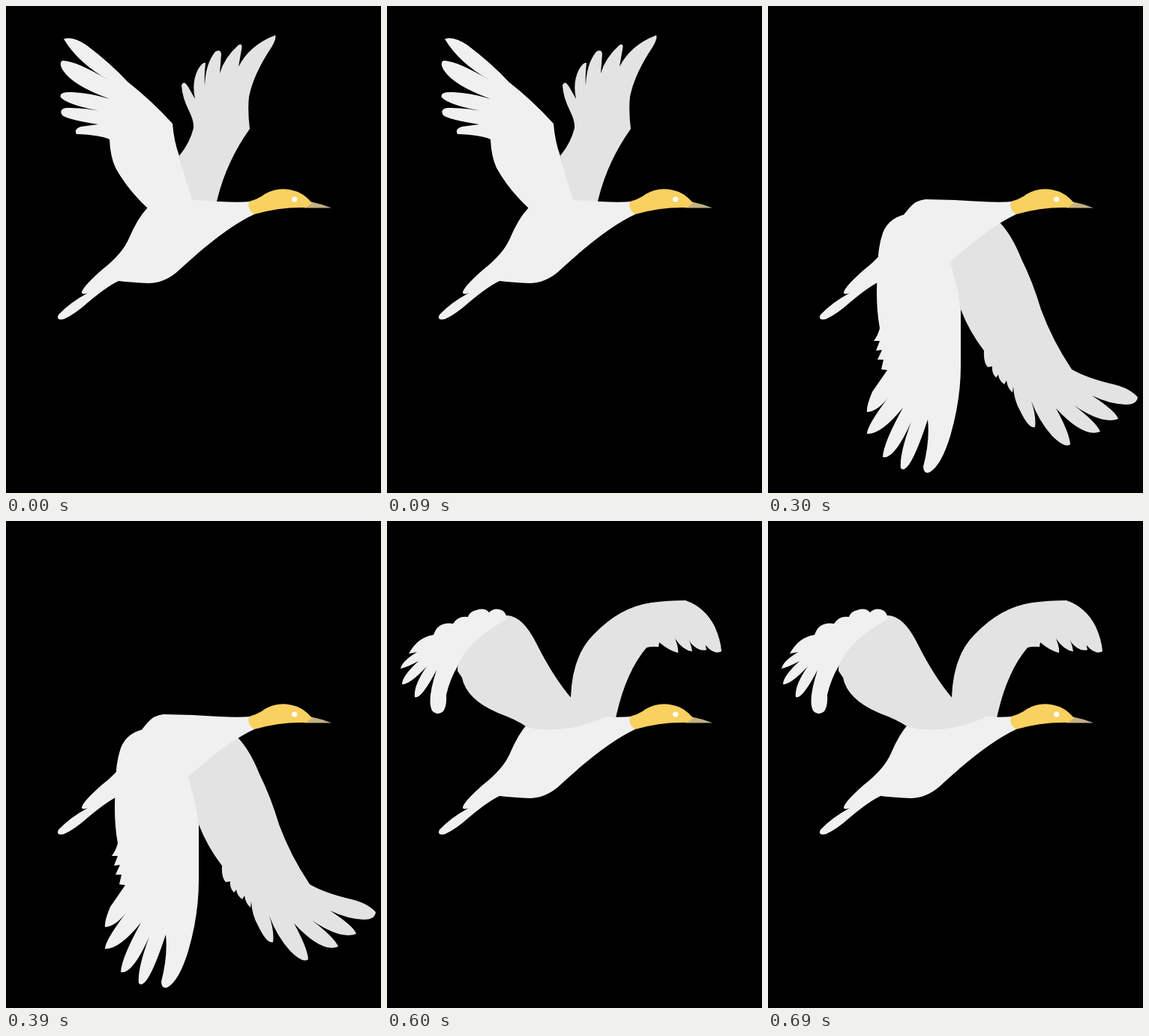
Animation of 500 by 650 pixels, one loop 0.75 s. Source, as an HTML page:

```html
<!DOCTYPE html>
<html lang="en">
<head>
<meta charset="utf-8">
<title>Flying bird</title>
<style>
  html, body { margin: 0; width: 100%; height: 100%; overflow: hidden; background: #000; }
  svg { display: block; }
  .light { fill: #f0f0f0; }
  .shade { fill: #e3e3e3; }
</style>
</head>
<body>
<svg width="500" height="650" viewBox="0 0 500 650">
  <defs>
    <linearGradient id="horn">
      <stop offset="0" stop-color="#cdb577"/>
      <stop offset="1" stop-color="#b9ad90"/>
    </linearGradient>
    <g id="bird">
      <path class="light" d="M325 261Q305 263 250 259L210 258Q197 259 188 270Q175 284 164 310Q155 331 128 352Q103 374 101 382Q101 386 109 383Q85 396 70 412Q66 420 77 418Q91 412 110 395Q135 374 150 367Q168 369 190 370Q210 370 228 355Q290 297 331 278Z"/>
      <path fill="url(#horn)" d="M405 261Q420 264 434 269.5L398 269.5Z"/>
      <path fill="#f9d160" d="M324 261Q336 258 345 251Q365 239 389 248Q400 253 408 263L400 269Q365 268 331 278Q321 272 324 261Z"/>
      <circle cx="384.7" cy="258" r="3.6" fill="#fff"/>
    </g>
  </defs>

  <g class="pose">
    <path class="shade" d="M359 39Q361 43 354 55Q330 91 324 121Q322 140 325 164Q293 209 281 261L245 262L231 200Q245 183 250 163Q251 154 244 140Q235 122 234 106Q237 98 243 108L252 124Q247 100 257 83Q263 74 266 76Q264 93 265 106Q266 77 279 61Q286 57 287 64L285 90Q291 69 310 52Q316 49 314 58L310 81Q325 52 359 39Z"/>
    <use href="#bird"/>
    <path class="light" d="M77 44Q89 40 107 52Q139 76 162 101Q195 127 222 157Q224 181 231 200Q238 230 249 260L189 270Q162 245 146 216Q139 201 138 178Q125 172 94 171Q90 164 100 161L123 158Q84 152 75 146Q70 138 80 136Q103 135 136 142Q83 133 73 122Q70 114 88 115Q112 116 138 124Q89 106 76 86Q70 76 75 73Q91 72 137 99Q96 76 77 44Z"/>
  </g>

  <g class="pose">
    <path class="shade" d="M266 312Q264 345 273 348Q300 350 345 350Q382 349 414 319Q432 300 433 265Q435 237 428 220Q417 224 414 257Q412 282 402 294Q409 269 405 240Q400 230 395 238L397 262Q396 280 386 294Q379 295 377 291Q384 276 379 264L364 265Q368 281 358 293Q363 276 357 266L345 266Q348 281 341 291Q334 285 331 275Z"/>
    <path class="shade" d="M243 259Q275 252 302 249Q317 250 325 263L320 280L245 285Z"/>
    <use href="#bird"/>
    <path class="shade" d="M172 288Q207 263 246 259Q238 293 258 326Q263 337 265 355Q260 365 245 366L200 345Z"/>
    <path class="light" d="M155 245Q160 246 165 262Q175 290 196 313Q222 341 250 363Q230 375 210 376Q185 379 165 386Q145 391 121 399L126 395L112 397Q97 395 85 388Q66 373 62 352Q61 343 72 347Q87 360 101 367Q72 348 61 323Q59 312 68 316Q86 333 119 354Q90 324 83 295Q82 280 92 281Q104 285 112 299Q124 317 144 332Q114 306 107 272Q108 259 117 260Q127 263 138 280Q147 296 157 308Q144 286 141 262Q146 244 155 245Z"/>
  </g>

  <g class="pose">
    <path class="shade" d="M238 335L308 288Q325 305 338 338Q353 368 364 405Q379 446 405 485Q426 497 461 505Q482 510 493 522Q492 532 477 532Q455 531 432 520Q464 541 467 551Q446 559 408 533Q438 556 443 568Q421 577 384 537Q402 570 403 585Q396 591 379 574Q361 554 351 527Q358 548 356 562Q348 565 336 540Q328 526 327 508L326 516Q319 510 318 500L315 505Q308 500 307 492L304 496Q298 490 299 481L293 482Q287 476 288 460Q268 434 257 405Z"/>
    <use href="#bird"/>
    <path class="light" d="M190 277Q162 280 153 303Q146 323 146 354Q143 398 149 430Q147 439 141 447L149 447L144 460L152 459L146 472L154 472L151 485L159 486Q150 499 139 515Q131 534 132 542Q146 541 160 523Q132 560 132 571Q151 572 180 536Q154 583 153 602Q168 606 191 555Q175 598 177 617Q188 628 213 552Q216 580 207 615Q208 626 216 622Q231 613 243 574Q257 526 257 480L257 405Q252 368 242 340L275 310L230 270Z"/>
  </g>

  <g class="pose">
    <path class="shade" d="M255 207Q295 171 317 164Q335 165 346 169Q351 177 350 188L349 208Q358 229 357 244L350 276Q340 307 340 337Q343 369 350 397Q348 407 336 402Q302 388 300 333Q300 360 296 376Q289 378 275 347L273 338L271 363Q258 358 256 329Q252 338 245 336L225 300Z"/>
    <use href="#bird"/>
    <path class="shade" d="M249 162Q261 171 261 187Q259 235 266 261Q270 275 277 284Q235 283 190 293Z"/>
    <path class="light" d="M101 211Q103 206 115 206Q135 200 163 179Q190 162 240 161Q255 162 250 179Q241 208 222 235Q202 264 195 292L220 340L187 370L188 413Q184 430 172 420Q158 398 153 366L150 367Q147 400 140 411Q132 418 125 405Q121 392 124 370Q116 370 126 347Q113 372 102 375Q93 374 94 362Q95 342 104 324Q92 352 79 357Q73 355 75 345Q78 321 91 302Q78 317 67 319Q60 315 64 300Q72 278 91 264Q78 268 70 266Q70 255 98 240Q88 244 82 241Q82 230 104 217Z"/>
  </g>

  <g class="pose">
    <path class="shade" d="M240 250L245 235Q247 180 275 152Q310 115 352 109Q373 106 398 106Q424 115 437 141Q445 159 446 174Q439 178 430 171Q418 161 409 142Q424 157 426 172Q416 175 405 163L396 147Q405 160 407 174Q395 173 384 157Q389 169 388 176Q376 173 363 162L362 168Q352 167 346 169Q318 202 305 263L260 285Z"/>
    <use href="#bird"/>
    <path class="shade" d="M160 126Q181 127 199 163Q222 209 247 238L290 262Q247 281 207 278Q195 278 185 274Q172 265 150 257Q106 239 100 209L94 200Q94 150 160 126Z"/>
    <path class="light" d="M160 131Q159 120 150 118Q142 116 136 122Q130 115 119 119Q110 121 108 128Q95 126 88 137Q68 134 62 152Q41 155 29 177L40 175Q20 187 18 197Q27 195 42 187Q20 207 20 218Q31 218 53 194Q35 220 37 235Q45 239 66 199Q53 239 60 253Q67 261 75 254Q80 247 79 232Q84 211 94 194Q107 160 160 131Z"/>
  </g>
</svg>
<script>
  const HOLD = 150;
  const poses = [...document.querySelectorAll('.pose')];

  function draw() {
    const current = Math.floor(performance.now() / HOLD) % poses.length;
    poses.forEach((pose, i) => { pose.style.display = i === current ? '' : 'none'; });
    requestAnimationFrame(draw);
  }
  draw();
</script>
</body>
</html>
```
